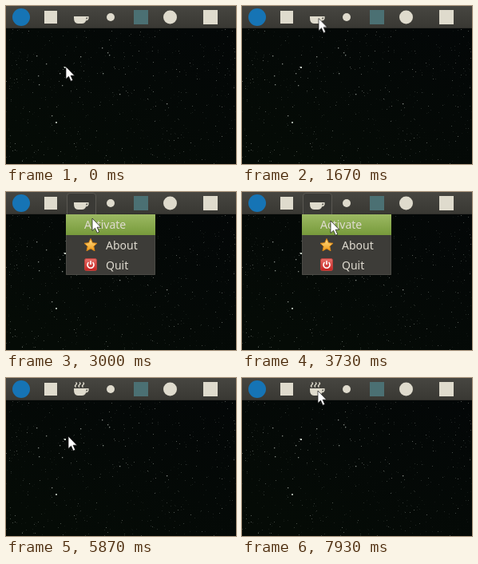
Animation, 288 px wide and 198 px high, one loop 8000 ms. Source, as an HTML page:

```html
<!DOCTYPE html>
<html lang="en">
<head>
<meta charset="utf-8">
<title>Panel menu</title>
<style>
  html, body { margin: 0; width: 100%; height: 100%; overflow: hidden; background: #040806; }
  svg { display: block; width: 100vw; height: 100vh; }
  text { font: 14px "Noto Sans", "Open Sans", sans-serif; fill: #dfdbd0; }
  .icon { fill: #dfdbcd; }
  .menu, .hover, .steam { visibility: hidden; animation: 8s step-end infinite; }
  .menu { animation-name: menu; }
  .hover { animation-name: hover; }
  .steam { animation-name: steam; }
  .pointer { animation: pointer 8s linear infinite; }

  @keyframes menu {
    0%, 47.4% { visibility: hidden; }
    24.1% { visibility: visible; }
  }
  @keyframes hover {
    0%, 47.4% { visibility: hidden; }
    35% { visibility: visible; }
  }
  @keyframes steam {
    0% { visibility: hidden; }
    47.4%, 100% { visibility: visible; }
  }
  @keyframes pointer {
    0%, 14.1% { transform: translate(75px, 76px); animation-timing-function: ease-in; }
    16.6% { transform: translate(82px, 57px); animation-timing-function: ease-out; }
    20.4%, 31.2% { transform: translate(96px, 15.5px); animation-timing-function: ease-in-out; }
    37%, 40% { transform: translate(108px, 33px); }
    42.5%, 55% { transform: translate(111px, 36px); animation-timing-function: ease-in-out; }
    63.4%, 86.6% { transform: translate(78px, 73px); animation-timing-function: ease-in-out; }
    96.6% { transform: translate(97px, 27px); animation-timing-function: ease-out; }
    99%, 99.99% { transform: translate(95px, 16px); animation-timing-function: step-end; }
    100% { transform: translate(75px, 76px); }
  }
</style>
</head>
<body>
<svg viewBox="0 0 288 198" preserveAspectRatio="none">
  <defs>
    <linearGradient id="sky" x1="1" y1="0" x2="0.3" y2="1">
      <stop offset="0" stop-color="#030607"/>
      <stop offset="1" stop-color="#050b06"/>
    </linearGradient>
    <linearGradient id="panel" x2="0" y2="1">
      <stop offset="0" stop-color="#474641"/>
      <stop offset="1" stop-color="#393833"/>
    </linearGradient>
    <linearGradient id="green" x2="0" y2="1">
      <stop offset="0" stop-color="#9cb963"/>
      <stop offset="1" stop-color="#779a3b"/>
    </linearGradient>
    <linearGradient id="gold" x2="0" y2="1">
      <stop offset="0" stop-color="#ffe08a"/>
      <stop offset="1" stop-color="#f09a18"/>
    </linearGradient>
    <linearGradient id="red" x2="0" y2="1">
      <stop offset="0" stop-color="#e8706a"/>
      <stop offset="1" stop-color="#c4211f"/>
    </linearGradient>
  </defs>

  <rect width="288" height="198" fill="url(#sky)"/>
  <g id="stars" fill="#c9d2c8"></g>

  <rect width="288" height="28" fill="url(#panel)"/>
  <rect y="27" width="288" height="1" fill="#302f2b"/>

  <g class="menu">
    <path d="M76.500 28V5q0-3.500 3.500-3.500h29q3.500 0 3.500 3.500v23" fill="#3b3a36" stroke="#5a5852"/>
    <rect x="75" y="28" width="112" height="76" fill="#3d3c38"/>
    <path d="M75.500 28v75.500h111V28.500H112" fill="none" stroke="#4b4a45"/>
    <rect class="hover" x="75" y="28" width="112" height="26" fill="url(#green)"/>
    <text x="98" y="46">Activate</text>
    <text x="125" y="72">About</text>
    <text x="125" y="97">Quit</text>
    <path d="M106 58.500l2.400 5.200 5.600.6-4.200 3.800 1.200 5.700-5-2.900-5 2.900 1.200-5.700-4.200-3.800 5.600-.6z"
          fill="url(#gold)" stroke="#d98412" stroke-linejoin="round"/>
    <rect x="98.500" y="83.500" width="15" height="15" rx="2" fill="url(#red)" stroke="#b9403b"/>
    <path d="M103.500 88.200a4 4 0 1 0 5 0M106 86.200v4.800" fill="none" stroke="#fff" stroke-width="1.600"/>
  </g>

  <circle cx="19" cy="14" r="11" fill="#1674b5"/>
  <g class="icon">
    <rect x="48" y="6" width="16" height="16"/>
    <circle cx="131" cy="14" r="5"/>
    <circle cx="205.500" cy="14" r="8.500"/>
    <rect x="247" y="5" width="18" height="18"/>
    <path d="M85 13h15.500v2q0 7-5 7H90q-5 0-5-7z"/>
  </g>
  <rect x="160" y="5" width="18" height="18" fill="#4b7073"/>
  <g fill="none" stroke="#dfdbcd" stroke-width="1.500">
    <path d="M100 13.700h2.800v1.800q-.5 2-3 2"/>
    <path class="steam" d="M87.500 11.500q-2-1.500 0-3t0-3M92 11.500q-2-1.500 0-3t0-3M96.500 11.500q-2-1.500 0-3t0-3"/>
  </g>

  <path class="pointer" d="M0 0V15.500L3.500 12.200 6.200 18.200 8.700 17.100 6.100 11.200H10.800Z"
        fill="#fff" stroke="#111" stroke-width=".7"/>
</svg>
<script>
  const stars = document.getElementById("stars");
  let seed = 41;
  const random = () => (seed = (seed * 16807) % 2147483647) / 2147483647;

  function addStar(x, y, size, opacity) {
    const star = document.createElementNS("http://www.w3.org/2000/svg", "rect");
    const attributes = { x, y, width: size, height: size, opacity };
    for (const name in attributes) star.setAttribute(name, attributes[name]);
    stars.append(star);
  }

  for (let i = 0; i < 620; i++) {
    const x = Math.floor(random() * 288);
    const y = 28 + Math.floor(random() * 170);
    addStar(x, y, 1, 0.06 + 0.38 * random() ** 3);
  }

  const bright = [
    [40, 87], [41, 98], [120, 52], [129, 61], [121, 84], [142, 110], [93, 63],
    [50, 72], [67, 84], [70, 99], [38, 62], [201, 122], [127, 58], [57, 137]
  ];
  bright.forEach(([x, y]) => addStar(x, y, 1.3, 0.65));
  addStar(73, 76, 2, 0.95);
  addStar(72, 76, 1, 0.6);
  addStar(62, 145, 2, 0.8);
</script>
</body>
</html>
```
